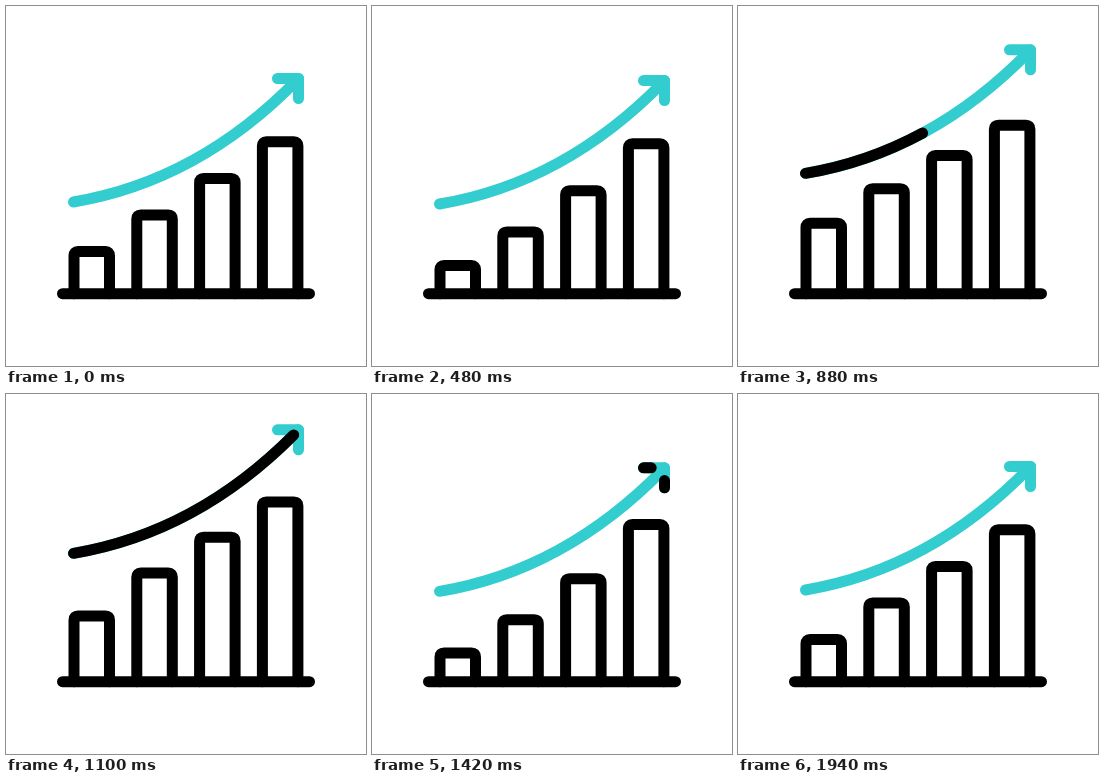
These frames come from a looping animation (360x360 px, 2.18 s). An HTML page:

```html
<!DOCTYPE html>
<html lang="en">
<head>
<meta charset="utf-8">
<title>Rising bar chart</title>
<style>
  html, body { margin: 0; width: 100%; height: 100%; overflow: hidden; background: #fff; }
  svg { display: block; width: 100vw; height: 100vh; }
  path { fill: none; stroke: #000; stroke-width: 11; stroke-linecap: round; stroke-linejoin: round; }
  .teal { stroke: #33cccf; }
</style>
</head>
<body>
<svg viewBox="0 0 360 360">
  <path class="bar"/><path class="bar"/><path class="bar"/><path class="bar"/>
  <path d="M56.5 287.7H303.5"/>
  <g id="arrow"></g>
</svg>
<script>
const LOOP = 2180, START = 220, STAGGER = 80;

const shaft = 'M67.5 196Q192.5 175 291 74.2';
const arms = ['M292.5 72.5H271.5', 'M292.5 72.5V92.5'];
const arrow = document.getElementById('arrow');
const bars = document.querySelectorAll('.bar');

function addPath(d, cls = '') {
  const p = document.createElementNS('http://www.w3.org/2000/svg', 'path');
  p.setAttribute('d', d);
  p.setAttribute('class', cls);
  p.setAttribute('pathLength', 1);
  return arrow.appendChild(p);
}
[shaft, ...arms].forEach(d => addPath(d, 'teal'));
const shaftInk = addPath(shaft);
const armInk = arms.map(d => addPath(d));

const inOut = u => (1 - Math.cos(Math.PI * u)) / 2;
const out = u => (1 - Math.exp(-4 * u)) / (1 - Math.exp(-4));

function ease(t, from, to, curve = inOut) {
  return curve(Math.min(1, Math.max(0, (t - from) / (to - from))));
}

// Height above rest: dip, shoot up, drop back to the dip, settle.
function barLift(t) {
  return -17 * ease(t, -20, 165) + 47 * ease(t, 252, 812, out)
    - 47 * ease(t, 812, 1100) + 17 * ease(t, 1095, 1440);
}

function arrowLift(t) {
  return -4 * ease(t, 400, 560) + 42 * ease(t, 679, 1240, out)
    - 42 * ease(t, 1240, 1456) + 4 * ease(t, 1530, 1870);
}

function trim(path, start, end) {
  path.style.display = end - start > 0.001 ? '' : 'none';
  path.setAttribute('stroke-dasharray', `${end - start} 2`);
  path.setAttribute('stroke-dashoffset', -start);
}

function draw(t) {
  bars.forEach((bar, i) => {
    const x = 68 + 62.8 * i;
    const y = 245.6 - 36.6 * i - barLift(t - START - STAGGER * i);
    bar.setAttribute('d', `M${x} 287.7V${y + 4}q0 -4 4 -4h27.5q4 0 4 4V287.7`);
  });
  arrow.setAttribute('transform', `translate(0 ${-arrowLift(t)})`);
  trim(shaftInk, ease(t, 1100, 1400), ease(t, 630, 1145));
  armInk.forEach(p => trim(p, ease(t, 1280, 1520), ease(t, 1100, 1280)));
}

const begin = performance.now();
function tick() {
  draw((performance.now() - begin) % LOOP);
  requestAnimationFrame(tick);
}
tick();
</script>
</body>
</html>
```
